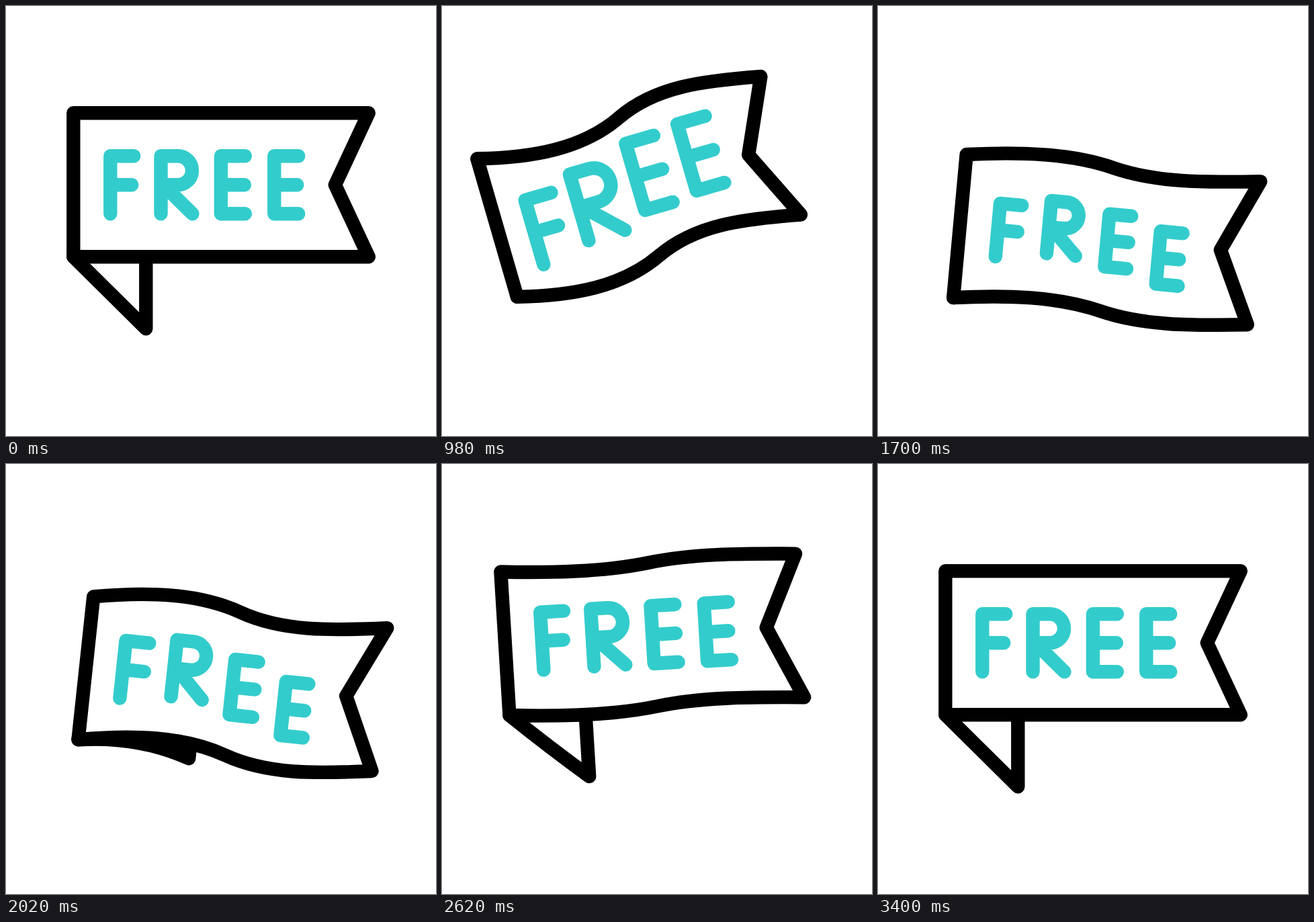
Animation of 640 by 640 pixels, one loop 3.6 s. Source, as an HTML page:

```html
<!DOCTYPE html>
<html lang="en">
<head>
<meta charset="utf-8">
<title>Free banner</title>
<style>
  html, body { margin: 0; width: 100%; height: 100%; overflow: hidden; background: #fff; }
  svg { display: block; width: 100vw; height: 100vh; }
  path { fill: none; stroke: #000; stroke-width: 20.4; stroke-linecap: round; stroke-linejoin: round; }
  #flag { fill: #fff; }
  #word path { stroke: #33cccc; }
</style>
</head>
<body>
<svg viewBox="0 0 640 640" role="img" aria-label="FREE">
  <g id="banner">
    <path id="tail"/>
    <path id="flag"/>
    <g id="word"></g>
  </g>
</svg>
<script>
const LOOP = 3600, STEP = 20, END = 3400;
const W = 439.5, H = 214;
const $ = id => document.getElementById(id);

// Smooth interpolation through [time, value] keys
function at(t, keys) {
  if (t <= keys[0][0]) return keys[0][1];
  for (let i = 1; i < keys.length; i++) {
    const [t0, a] = keys[i - 1], [t1, b] = keys[i];
    if (t <= t1) {
      const u = (t - t0) / (t1 - t0);
      return a + (b - a) * u * u * (3 - 2 * u);
    }
  }
  return keys[keys.length - 1][1];
}

const tilt = [[40, 0], [960, -16.2], [1875, 7.5], [2540, -3.95], [3030, 2.4], [3400, 0]];
const sink = [[0, 0], [1350, 1], [2700, 0]];
const wave = [[0, 0], [1140, 20.8], [1880, -16], [2830, 9.5], [3100, -4], [3400, 0]];
const size = [[0, 1], [700, 1.2], [830, 1.2], [1450, 0.915], [1620, 0.915], [2030, 1]];

// Letters around their own centre; the banner's lower left corner is the origin.
// up and down are the vertical shifts at the two ends of the swing.
const bar = (x, y, w) => [['M', x, y], ['L', x + w, y]];
const letterE = mid => [['M', 18, -43], ['L', -18, -43], ['L', -18, 43], ['L', 18, 43], ...bar(-18, 0, mid)];
const letters = [
  { x: 72.5, spread: -6, up: 22, down: -4,
    d: [['M', -17.5, 43], ['L', -17.5, -43], ['L', 17.5, -43], ...bar(-17.5, 0, 32)] },
  { x: 153.7, spread: 0, up: 5, down: -14,
    d: [['M', -23.5, 43], ['L', -23.5, -43], ['L', 1.5, -43],
        ['C', 13.5, -43, 23, -33.5, 23, -21.5], ['C', 23, -9.5, 13.5, 0, 1.5, 0],
        ['L', -20, 0], ['L', 23.5, 43]] },
  { x: 237.6, spread: 13, up: -15.5, down: 5, d: letterE(35) },
  { x: 317, spread: 25, up: -22, down: 29, d: letterE(34) }
];

for (const l of letters) {
  l.el = document.createElementNS('http://www.w3.org/2000/svg', 'path');
  $('word').append(l.el);
  l.shift = [[0, 0], [1000, l.up], [1960, l.down], [2720, 0]];
}

const scaled = (d, s) => d.map(([cmd, ...n]) => cmd + n.map(v => (v * s).toFixed(2))).join(' ');

// S-shaped edge across the banner, from left to right or back
const bend = [[0, 0], [80, 1.1], [155, 1.5], [220, 0], [285, -1.5], [355, -0.9], [W, 0]];
function edge(y, w, back) {
  const pts = back ? [...bend].reverse() : bend;
  return 'C' + pts.slice(1).map(([x, k]) => `${x} ${y + k * w}`).join(' ');
}

function tailPath(n, w) {
  const fold = 0.9 * Math.sqrt(n) + 0.5 * n * n;
  const x = 108 + 62 * fold - w * fold;
  const y = 107 * (1 - fold) + 1.3 * w * fold;
  const bow = fold < 1 ? 44 * w * (fold * (1 - fold)) ** 2 : 0;
  return `M0 0Q${x / 2 - bow * 0.3} ${y / 2 + bow} ${x} ${y}L${x} ${Math.min(-20, y)}`;
}

function draw(t) {
  const n = at(t, sink), w = at(t, wave);
  $('banner').setAttribute('transform',
    `translate(${100.3 + 14.2 * n} ${373.3 + 73 * n}) rotate(${at(t, tilt)})`);
  $('flag').setAttribute('d',
    `M0 ${-H}${edge(-H, w)}L389.5 ${-H / 2}L${W} 0${edge(0, w, true)}Z`);
  $('tail').setAttribute('d', tailPath(n, w));
  letters.forEach((l, i) => {
    const s = at(t - 90 * i, size);
    l.el.setAttribute('d', scaled(l.d, s));
    l.el.setAttribute('transform',
      `translate(${l.x + l.spread * (s - 1)} ${-107 + at(t, l.shift)})`);
  });
}

function frame(now) {
  const t = Math.floor((now % LOOP) / STEP) * STEP;
  draw(Math.min(t, END));
  requestAnimationFrame(frame);
}

draw(0);
requestAnimationFrame(frame);
</script>
</body>
</html>
```
